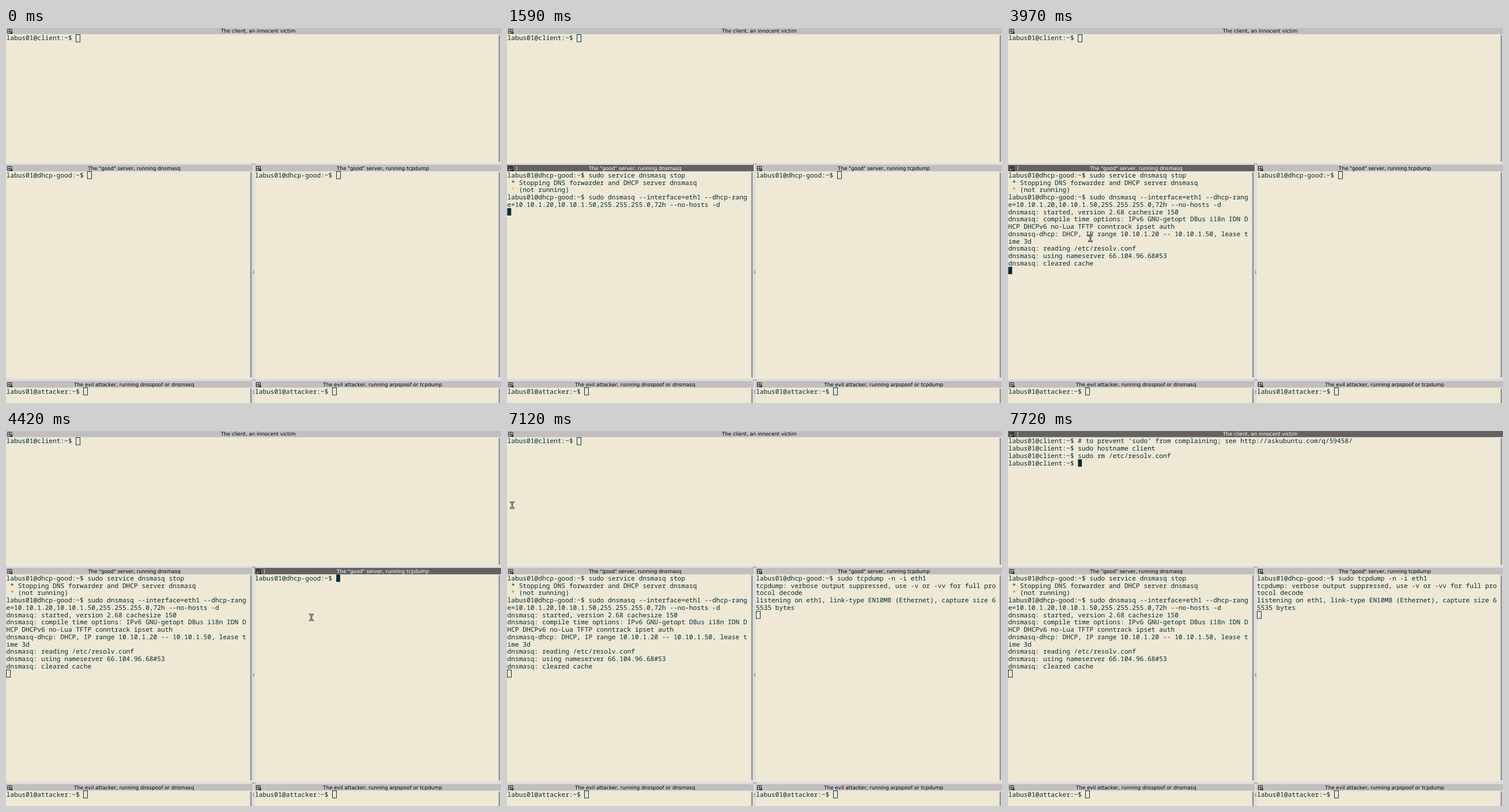
These frames come from a looping animation (859x652 px, 8000 ms). An HTML page with a canvas:

```html
<!DOCTYPE html>
<html lang="en">
<head>
<meta charset="utf-8">
<title>Terminal session</title>
<style>
  html, body { margin: 0; width: 100%; height: 100%; overflow: hidden; background: #eee8d5; }
  canvas { display: block; }
</style>
</head>
<body>
<canvas id="stage" width="859" height="652"></canvas>
<script>
const ctx = document.getElementById('stage').getContext('2d');
const LOOP = 8000, CELL = 6.72, ROW = 12.75;
const INK = '#002b36', PAPER = '#eee8d5', BAR = '#c0bebf', BAR_ON = '#656263', GAP = '#dddcdb';
const MONO = '11.2px "Noto Sans Mono", "DejaVu Sans Mono", monospace';
const SANS = '8.72px "DejaVu Sans", Verdana, sans-serif';

const prompt = host => `labus01@${host}:~$ `;
const good = prompt('dhcp-good'), client = prompt('client'), evil = prompt('attacker');

// Each log entry is [time, appended text].
const panes = [
  { x: 0, y: -0.5, w: 859, h: 235.5, cols: 126, mid: 437.7, title: 'The client, an innocent victim', log: [
    [0, client],
    [7500, "# to prevent 'sudo' from complaining; see http://askubuntu.com/q/59458/\n" + client],
    [7580, 'sudo hostname client\n' + client],
    [7660, 'sudo rm /etc/resolv.conf\n' + client]
  ] },
  { x: 0, y: 238, w: 428, h: 372, cols: 62, mid: 222.5, title: 'The "good" server, running dnsmasq', log: [
    [0, good],
    [1310, 'sudo service dnsmasq stop\n'],
    [1390, ' * Stopping DNS forwarder and DHCP server dnsmasq\n'],
    [1450, ' * (not running)\n'],
    [1500, good],
    [1550, 'sudo dnsmasq --interface=eth1 --dhcp-range=10.10.1.20,10.10.1.50,255.255.255.0,72h --no-hosts -d\n'],
    [1650, 'dnsmasq: started, version 2.68 cachesize 150\n' +
      'dnsmasq: compile time options: IPv6 GNU-getopt DBus i18n IDN DHCP DHCPv6 no-Lua TFTP conntrack ipset auth\n' +
      'dnsmasq-dhcp: DHCP, IP range 10.10.1.20 -- 10.10.1.50, lease time 3d\n' +
      'dnsmasq: reading /etc/resolv.conf\n' +
      'dnsmasq: using nameserver 66.104.96.68#53\n' +
      'dnsmasq: cleared cache\n']
  ] },
  { x: 431.5, y: 238, w: 427.5, h: 372, cols: 62, mid: 654, title: 'The "good" server, running tcpdump', log: [
    [0, good],
    [4830, 'sudo tcpdump -n -i eth1\n'],
    [4950, 'tcpdump: verbose output suppressed, use -v or -vv for full protocol decode\n' +
      'listening on eth1, link-type EN10MB (Ethernet), capture size 65535 bytes\n']
  ] },
  { x: 0, y: 614, w: 428, h: 60, cols: 62, mid: 222.2, title: 'The evil attacker, running dnsspoof or dnsmasq', log: [[0, evil]] },
  { x: 431.5, y: 614, w: 427.5, h: 60, cols: 62, mid: 653.7, title: 'The evil attacker, running arpspoof or tcpdump', log: [[0, evil]] }
];

// [time, focused pane], -1 while the window is in the background
const focus = [[0, -1], [650, 2], [710, 1], [3180, -1], [3810, 1], [4340, 2], [6370, -1], [7160, 2], [7440, 0]];
const blinkOff = [[1690, 2270], [2900, 3180], [5210, 5820]];

// Pointer strokes: shown from start to hide, moving from start to end
const strokes = [
  { start: 60, end: 290, hide: 1310, from: [80, 268], to: [94, 255] },
  { start: 3810, end: 4300, hide: 4830, from: [12, 380], to: [530, 324] },
  { start: 4830, end: 5210, hide: 5210, from: [530, 324], to: [13, 458] },
  { start: 7120, end: 7420, hide: 7500, from: [9, 129], to: [250, 120] }
];

const within = (t, a, b) => t >= a && t < b;

function rect(color, x, y, w, h) {
  ctx.fillStyle = color;
  ctx.fillRect(x, y, w, h);
}

function text(str, x, y, color) {
  ctx.fillStyle = color;
  ctx.fillText(str, x, y);
}

function wrap(str, cols) {
  const rows = [];
  for (const line of str.split('\n')) {
    let i = 0;
    do {
      rows.push(line.slice(i, i + cols));
      i += cols;
    } while (i < line.length);
  }
  return rows;
}

function drawIcon(x, y, on) {
  const fills = on ? ['#b5343a', '#3a46b8', '#b9b7a8', '#8d8b8c'] : ['#d6d4d4', '#d6d4d4', '#d6d4d4', BAR];
  rect('#151515', x, y, 8, 8);
  fills.forEach((c, i) => rect(c, x + 1 + (i % 2) * 3.5, y + 1 + (i >> 1) * 3.5, 2.6, 2.6));
  ctx.fillStyle = '#111';
  ctx.beginPath();
  ctx.moveTo(x + 4.8, y + 6);
  ctx.lineTo(x + 9.6, y + 6);
  ctx.lineTo(x + 7.2, y + 9);
  ctx.fill();
}

function drawTitle(p, on) {
  rect(on ? BAR_ON : BAR, p.x, p.y, p.w, 11.2);
  drawIcon(p.x + 2.5, p.y + 2.2, on);
  rect(on ? '#d2d0d0' : '#d0cece', p.x + 16.5, p.y + 2, 1, 8);
  ctx.font = SANS;
  ctx.textAlign = 'center';
  text(p.title, p.mid, p.y + 8.7, on ? '#fff' : '#000');
}

function drawScrollbar(p) {
  const x = p.x + p.w - 6;
  rect('#eae8e2', x, p.y + 11.2, 6, p.h - 11.2);
  ctx.fillStyle = '#929496';
  ctx.beginPath();
  ctx.roundRect(x + 1.8, p.y + 12.5, 2.8, p.h - 14.5, 1.4);
  ctx.fill();
}

function drawPane(p, t, on) {
  const x = p.x + 0.5, y = p.y + 11.5;
  rect(PAPER, p.x, p.y, p.w, p.h);
  drawScrollbar(p);
  drawTitle(p, on);

  const rows = wrap(p.log.filter(e => t >= e[0]).map(e => e[1]).join(''), p.cols);
  ctx.font = MONO;
  ctx.textAlign = 'left';
  rows.forEach((row, i) => {
    const base = y + i * ROW + 10.3;
    if (row.startsWith(' * (')) {
      text('*', x + CELL, base, t < 3810 ? '#d3c51c' : '#b58900');
      row = row.replace('*', ' ');
    }
    text(row, x, base, INK);
  });

  const last = rows.length - 1;
  const cx = x + rows[last].length * CELL, cy = y + last * ROW;
  if (!on) {
    ctx.strokeStyle = INK;
    ctx.lineWidth = 0.95;
    ctx.strokeRect(Math.floor(cx) + 0.5, Math.floor(cy) + 0.5, 7, 12.6);
  } else if (!blinkOff.some(b => within(t, ...b))) {
    rect(INK, cx, cy, CELL, ROW);
  }
}

function drawGrip(x, y, dx, dy) {
  for (let i = -2; i <= 2; i++) rect('#8b8989', x + i * dx, y + i * dy, dx ? 0.8 : 2.4, dy ? 0.8 : 2);
}

function drawPointer(t) {
  const s = strokes.find(k => within(t, k.start, k.hide));
  if (!s) return;
  const u = Math.min(1, (t - s.start) / (s.end - s.start));
  const k = u * u * (3 - 2 * u);
  const [x, y] = s.from.map((a, i) => a + (s.to[i] - a) * k);
  const beam = new Path2D();
  for (const d of [-5, 5]) {
    beam.moveTo(x - 2.5, y + d);
    beam.lineTo(x + 2.5, y + d);
  }
  beam.moveTo(x, y - 5);
  beam.lineTo(x, y + 5);
  ctx.lineCap = 'square';
  for (const [color, width] of [['#222', 2.6], ['#d8d4c8', 0.9]]) {
    ctx.strokeStyle = color;
    ctx.lineWidth = width;
    ctx.stroke(beam);
  }
  ctx.lineCap = 'butt';
}

function draw(t) {
  const active = focus.filter(f => t >= f[0]).pop()[1];
  rect(GAP, 0, 0, 859, 652);
  panes.forEach((p, i) => drawPane(p, t, i === active));
  drawGrip(429.5, 235.6, 1.3, 0);
  drawGrip(429.5, 611.2, 1.3, 0);
  drawGrip(428.6, 424, 0, 1.3);
  drawGrip(428.6, 632.5, 0, 1.3);
  drawPointer(t);
}

ctx.textRendering = 'geometricPrecision';
const begin = performance.now();
function tick() {
  draw((performance.now() - begin) % LOOP);
  requestAnimationFrame(tick);
}
tick();
</script>
</body>
</html>
```
